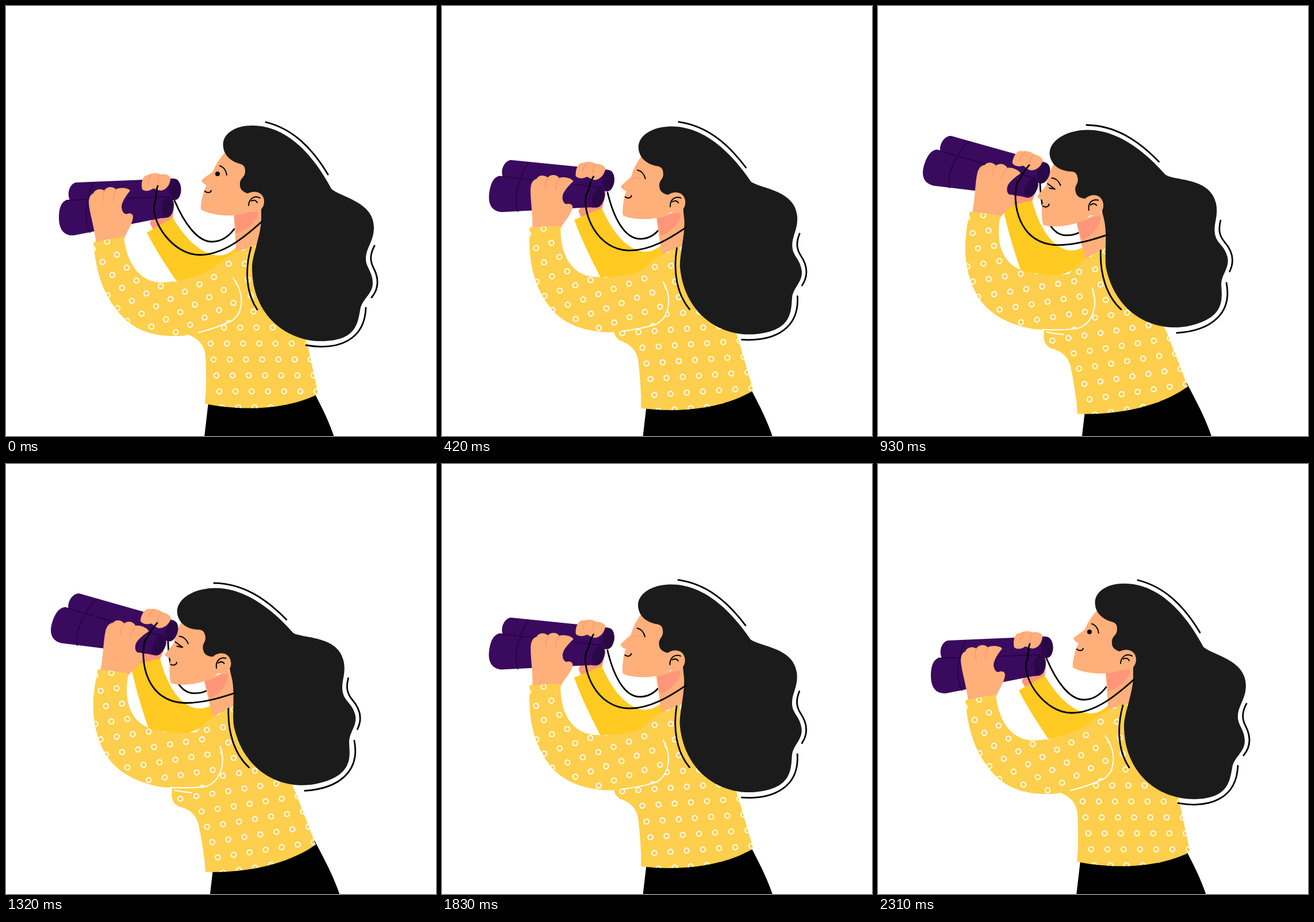
An HTML page that plays this animation: 748x748 px, repeating every 2340 ms.

```html
<!DOCTYPE html>
<html lang="en">
<head>
<meta charset="utf-8">
<title>Looking through binoculars</title>
<style>
  html, body { margin: 0; width: 100%; height: 100%; overflow: hidden; background: #fff; }
  svg { display: block; width: 100vw; height: 100vh; }
  .knit { fill: #fecf4c; }
  .gold { fill: #ffca22; }
  .skin { fill: #ffaf7a; }
  .shade { fill: #ff967a; }
  .tube { fill: #3a0a5e; }
  .glass { fill: #2a0846; }
  .hair { fill: #1b1b1b; }
  .ink, .seam, .fold, .edge { fill: none; stroke-linecap: round; stroke-linejoin: round; }
  .ink { stroke: #000; stroke-width: 2.8; }
  .fine { stroke-width: 2; }
  .seam { stroke: #fff; stroke-width: 2; }
  .fold { stroke: #ff967a; stroke-width: 1.6; }
  .edge { stroke: #210540; stroke-width: 1.6; }
  .dots circle { fill: none; stroke: #fff; stroke-width: 2; }
</style>
</head>
<body>
<svg viewBox="0 0 748 748">
  <defs>
    <path id="torsoShape" d="M400 428L428 418L475 405L523 582L543 675C500 697 430 708 346 692C349 660 348 630 347 607C344 588 335 580 318 572C306 563 308 552 311 541L330 480C350 465 370 448 385 437Z"/>
    <path id="armShape" d="M152 411C178 406 190 403 205 402C210 450 235 483 275 481C310 478 340 468 357 458L392 465C420 500 410 540 390 550C370 558 350 564 335 568C320 573 305 574 296 574C270 575 230 570 202 540C165 500 156 455 152 411Z"/>
    <clipPath id="torsoClip"><use href="#torsoShape"/></clipPath>
    <clipPath id="armClip"><use href="#armShape"/></clipPath>
  </defs>

  <path id="skirt" d="M352 690L345 750L571 750C560 718 548 695 527 655Z"/>

  <g class="scope">
    <path class="shade" d="M250 378L258 392L290 371L293 340L270 340Z"/>
  </g>
  <path id="sleeve" class="gold" d="M245 394L290 368C312 405 340 433 370 434C385 434 395 425 402 418L410 450L360 490L306 492C280 455 258 420 245 394Z"/>
  <path id="farCord" class="ink"/>

  <g class="torso">
    <path class="skin" d="M396 362L401 432L440 440L462 390L455 350Z"/>
    <path class="shade" d="M397 364C410 363 420 360 428 357L439 358C437 375 420 390 401 395Z"/>
    <use href="#torsoShape" class="knit"/>
    <g class="dots" id="torsoDots" clip-path="url(#torsoClip)"></g>
    <path class="seam" d="M315 543Q329 549 344 552"/>
  </g>

  <g class="head">
    <path class="skin" d="M383 253C372 264 364 277 360 288L341 302C339 305 342 308 349 312L344 322C341 335 338 345 339 354C352 362 380 366 395 364C408 362 416 360 421 357L432 345L425 270Z"/>
    <path class="hair" d="M378 246C374 222 400 207 430 208C490 209 535 260 566 318C580 332 640 340 640 385C640 410 626 420 626 440C626 455 638 462 638 482C638 500 622 508 617 524C612 548 613 583 548 583C490 583 428 540 428 455C428 435 443 400 444 372L444 350L420 326C414 324 407 320 407 312C406 298 416 300 416 287C416 277 412 276 402 273C390 268 380 260 378 246Z"/>
    <path class="skin" d="M419 327C432 319 449 324 449 340C449 352 440 360 428 358L416 355Z"/>
    <path class="ink fine" d="M422 347C423 334 433 329 442 334M427 339Q434 336 437 342"/>
    <path class="ink fine" d="M372 278C379 280 383 287 384 294M346 322C350 326 356 325 357 321"/>
    <ellipse id="eye" cx="368" cy="292" rx="4" ry="4"/>
    <path id="lid" class="fold" d="M361 294Q365 286 374 293"/>
    <path id="squint" class="ink fine" d="M363 286L373 298L364 294"/>
    <path class="ink" d="M452 202C500 214 533 248 560 293M641 417C633 432 633 443 639 455C648 472 650 490 636 507M626 525C624 580 580 600 522 590M426 420C415 460 418 500 437 528"/>
  </g>

  <g class="scope">
    <path class="tube" d="M122 307L290 300C304 300 306 318 304 325C302 336 296 338 290 338L112 340C104 325 112 308 122 307Z"/>
    <ellipse class="glass" cx="294" cy="319" rx="10" ry="18"/>
    <path class="tube" d="M104 338L283 331C293 334 294 350 289 360C286 368 278 369 270 369L118 399C98 400 92 385 92 368C92 350 97 341 104 338Z"/>
    <ellipse class="glass" cx="281" cy="350" rx="10" ry="18" transform="rotate(6 281 350)"/>
    <path class="edge" d="M105 338L283 332M153 307C146 318 144 328 143 337C137 355 138 378 146 394"/>
    <path class="skin" d="M237 319C234 308 238 293 247 294C254 290 264 290 268 293C274 291 288 294 286 301C285 312 278 320 270 321C262 321 258 316 255 318C250 322 242 323 237 319Z"/>
    <path class="fold" d="M252 295Q247 303 248 309M268 294Q263 302 265 309"/>
  </g>

  <g class="arm">
    <path class="skin" d="M157 414C154 385 145 360 144 342C144 333 147 328 152 326C155 318 165 317 171 321C175 314 186 313 191 319C197 315 212 316 216 321C209 330 201 341 201 350C202 358 205 362 210 362C213 360 221 360 221 367C220 380 210 392 205 406Z"/>
    <path class="fold" d="M172 321Q166 330 171 341M192 319Q185 329 188 340"/>
    <use href="#armShape" class="knit"/>
    <g class="dots" id="armDots" clip-path="url(#armClip)"></g>
    <path class="seam" d="M395 473C418 503 412 540 388 550C370 558 350 564 335 568"/>
  </g>
  <path id="nearCord" class="ink"/>
</svg>

<script>
const LOOP = 2340, HALF = LOOP / 2;
const $ = id => document.getElementById(id);
const each = (cls, value) =>
  document.querySelectorAll('.' + cls).forEach(el => el.setAttribute('transform', value));
const clamp = v => Math.max(0, Math.min(1, v));

// Slanted grid of rings, turned by deg around (x, y).
function addDots(parent, x, y, deg) {
  const a = deg * Math.PI / 180, c = Math.cos(a), s = Math.sin(a);
  let rings = '';
  for (let i = -9; i <= 14; i++) {
    for (let j = -9; j <= 12; j++) {
      const u = 28.2 * i + 5 * j, v = 27.75 * j;
      const cx = x + u * c - v * s, cy = y + u * s + v * c;
      if (cx > 140 && cx < 560 && cy > 390 && cy < 715)
        rings += `<circle cx="${cx.toFixed(1)}" cy="${cy.toFixed(1)}" r="4.3"/>`;
    }
  }
  parent.innerHTML = rings;
}

// Cubic ease with flat ends; a and b set how long it lingers at each end.
function ease(x, a, b) {
  let lo = 0, hi = 1;
  for (let i = 0; i < 24; i++) {
    const s = (lo + hi) / 2, r = 1 - s;
    if (3 * a * s * r * r + 3 * b * s * s * r + s * s * s < x) lo = s; else hi = s;
  }
  return lo * lo * (3 - 2 * lo);
}

// Each cord is a chain of two or three cubics: upright pose, leaning pose.
const cords = {
  nearCord: [
    [264, 313, 259, 325, 263, 335, 258, 345, 252, 375, 290, 433, 337, 433, 378, 433, 415, 402, 445, 375],
    [263, 277, 249, 292, 252, 296, 242, 308, 233, 340, 243, 415, 313, 416, 345, 416, 375, 406, 399, 398]
  ],
  farCord: [
    [293, 338, 310, 378, 333, 410, 358, 410, 375, 410, 388, 400, 397, 388],
    [282, 308, 283, 350, 296, 399, 328, 399, 340, 399, 345, 397, 350, 394]
  ]
};

function drawCord(id, k) {
  const [from, to] = cords[id];
  const n = from.map((v, i) => (v + (to[i] - v) * k).toFixed(2));
  $(id).setAttribute('d', `M${n[0]} ${n[1]}C${n.slice(2).join(' ')}`);
}

function draw(p) {
  const q = p * p;
  const lean = `rotate(${-9.25 * p} 458 695)`;
  each('torso', lean);
  each('arm', `${lean} rotate(${27.5 * p} 386.3 498.3)`);
  each('head', `rotate(${-13.7 * p} 429 589)`);
  each('scope', `translate(${10 * q - 25.2 * p} ${8.8 * q - 43.2 * p}) rotate(${18.7 * p} 281 350)`);
  $('sleeve').setAttribute('transform',
    `translate(${11 * q - 39 * p} ${12 * q - 56.2 * p}) rotate(${16.6 * p} 245 394)`);
  $('skirt').setAttribute('transform', `translate(${10 * p} 0)`);
  for (const id in cords) drawCord(id, p / 0.963);

  const open = 1 - clamp((p - 0.12) / 0.3);
  $('eye').setAttribute('ry', 4 * open);
  $('lid').setAttribute('opacity', clamp((p - 0.25) / 0.1) * clamp((0.7 - p) / 0.15));
  $('squint').setAttribute('opacity', clamp((p - 0.5) / 0.2));
}

function frame() {
  const t = performance.now() % LOOP;
  draw(t < HALF ? ease(t / HALF, 0.41, 0.292) : 1 - ease(t / HALF - 1, 0.527, 0.567));
  requestAnimationFrame(frame);
}

addDots($('torsoDots'), 356, 587, 0);
addDots($('armDots'), 176, 410, -26.9);
frame();
</script>
</body>
</html>
```
